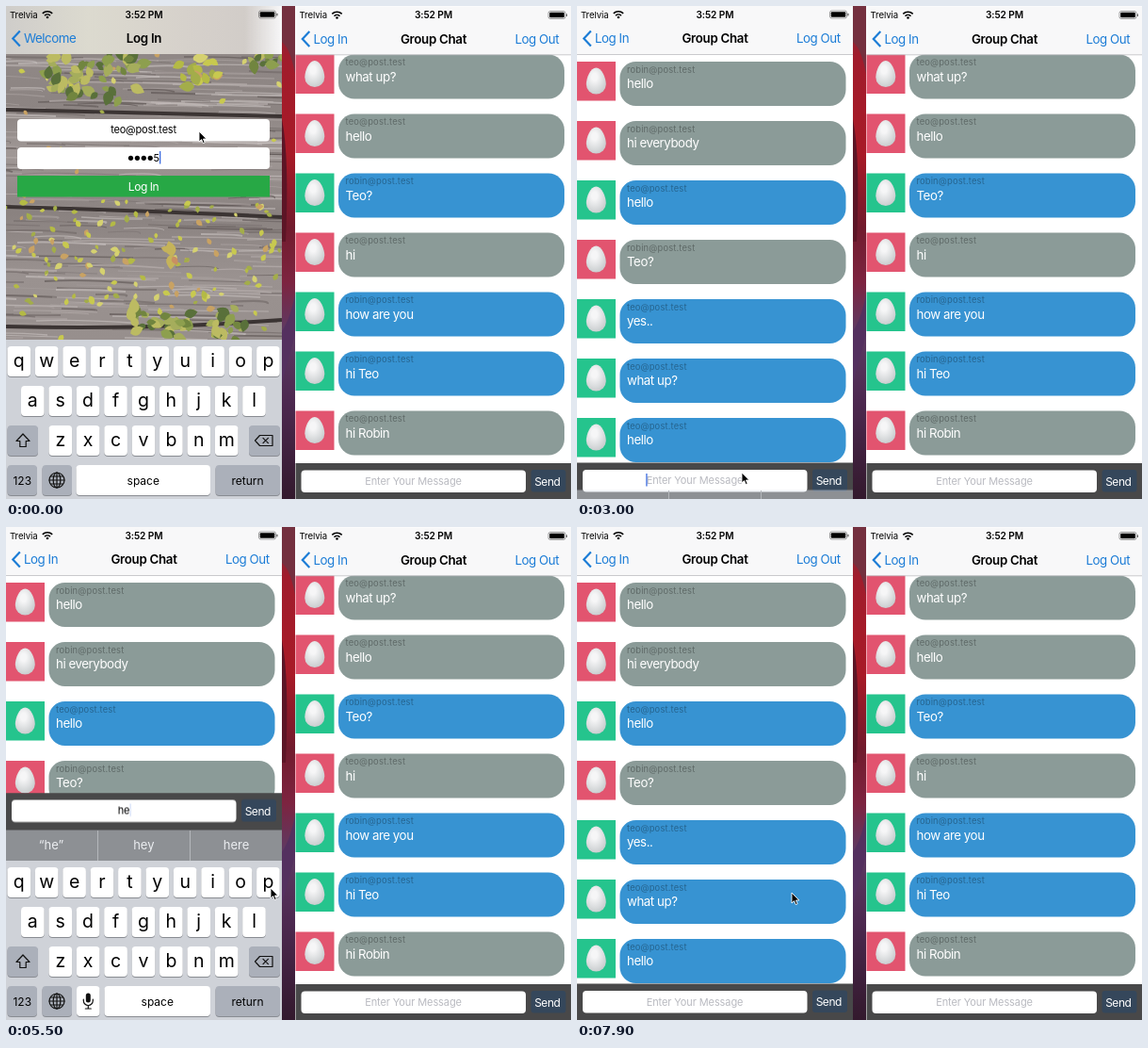
An HTML page that plays this animation: 600x523 px, repeating every 8 s.

```html
<!DOCTYPE html>
<html lang="en">
<head>
<meta charset="utf-8">
<title>Group chat on two phones</title>
<style>
html, body { margin: 0; width: 100%; height: 100%; overflow: hidden; background: #fff; }
svg { display: block; width: 100vw; height: 100vh; }
text { font: 400 13.3px Inter, Roboto, sans-serif; letter-spacing: -.45px; fill: #000; white-space: pre; }
.mid { text-anchor: middle; }
.title { font-weight: 600; letter-spacing: -.3px; }
.link { fill: #1b7cd6; }
.small { font-size: 9.6px; letter-spacing: -.1px; }
.clock { font-size: 10.2px; font-weight: 600; letter-spacing: -.1px; }
.mail { font-size: 9.4px; letter-spacing: .15px; fill: #000; fill-opacity: .32; }
.msg, .send { fill: #fff; }
.send { font-size: 12px; }
.field { font-size: 11px; letter-spacing: -.2px; }
.hint { font-size: 11px; letter-spacing: -.1px; fill: #b9bac0; }
.key { font-size: 19.5px; letter-spacing: 0; }
.cap { font-size: 12px; letter-spacing: 0; }
.guess { font-size: 13px; letter-spacing: 0; fill: #eceef1; }
.line { fill: none; stroke: #111; stroke-width: 1.2; stroke-linejoin: round; stroke-linecap: round; }
.spin { animation: spin 1s linear infinite; transform-origin: 146px 179px; }
@keyframes spin { to { transform: rotate(360deg); } }
</style>
</head>
<body>
<script>
const LOOP = 8000;
let sheet = '', count = 0, seed = 41;

// Returns a style attribute that plays [ms, declarations] pairs over the loop.
function track(frames, ease = 'ease-in-out') {
  const id = 'k' + count++;
  const all = [[0, frames[0][1]], ...frames, [LOOP, frames[frames.length - 1][1]]];
  sheet += `@keyframes ${id}{${all.map(([t, css]) => `${t / LOOP * 100}%{${css}}`).join('')}}`;
  return `style="animation:${id} ${LOOP}ms ${ease} infinite"`;
}
const show = (from, to) =>
  track([[0, 'opacity:0'], [from, 'opacity:1'], [to, 'opacity:0']], 'step-end');
const move = (x, y) => `transform:translate(${x}px,${y}px)`;
const slide = (x0, x1, from = 1985, to = 2500) => track([[from, move(x0, 0)], [to, move(x1, 0)]]);
const fade = (a, b, from = 2020, to = 2400) => track([[from, 'opacity:' + a], [to, 'opacity:' + b]]);

const rand = () => (seed = seed * 16807 % 2147483647) / 2147483647;
const span = (a, b) => a + rand() * (b - a);
const times = (n, make) => Array.from({ length: n }, (_, i) => make(i)).join('');
const pick = list => list[Math.floor(rand() * list.length)];

const rect = (x, y, w, h, fill, r = 0, extra = '') =>
  `<rect x="${x}" y="${y}" width="${w}" height="${h}" rx="${r}" fill="${fill}" ${extra}/>`;
const text = (x, y, cls, str, extra = '') => `<text x="${x}" y="${y}" class="${cls}" ${extra}>${str}</text>`;
const group = (attrs, ...parts) => `<g ${attrs}>${parts.join('')}</g>`;

// Wooden planks with scattered leaves
const greens = ['#71853f', '#8d9f4e', '#a5ad5c', '#59703a', '#bcbb62'];
const yellows = ['#c8c94f', '#b4ba45', '#d5d170', '#a3ad4a', '#c9a263'];
const grains = ['#5a5251', '#6f6665', '#aca4a2', '#bdb5b3', '#cac3c1'];
function leaf(x, y, size, fill) {
  return `<path d="M0 0Q.35-.65 1 0Q.35.65 0 0Z" fill="${fill}" transform="translate(${x.toFixed(1)} ${y.toFixed(1)}) rotate(${span(0, 360).toFixed()}) scale(${size.toFixed(1)})"/>`;
}
const cluster = (x, y, w, h, n, tones) =>
  times(n, () => leaf(x + span(-w, w), y + span(-h, h), span(8, 17), pick(tones)));

function photo() {
  const grain = times(320, () =>
    `<path d="M${span(-50, 270).toFixed()} ${span(50, 356).toFixed()}q40 ${span(-3, 3).toFixed(1)} ${span(30, 130).toFixed()} 2" stroke="${pick(grains)}" stroke-width="${span(.6, 2.2).toFixed(1)}" opacity=".6" fill="none"/>`);
  const seams = [[110, 117], [213, 224], [340, 333]].map(([a, b]) =>
    `<path d="M0 ${a}Q150 ${a + 4} 293 ${b}" stroke="#3b3433" stroke-width="4" fill="none"/>`).join('');
  return rect(0, 0, 293, 523, 'url(#wood)') + grain + seams +
    times(60, () => leaf(span(0, 290), span(54, 350), span(5, 9), pick(yellows))) +
    times(110, () => leaf(span(0, 290), span(206, 325), span(5, 10), pick(yellows))) +
    cluster(92, 74, 48, 22, 60, greens) + cluster(208, 70, 20, 16, 16, yellows) +
    cluster(276, 60, 14, 8, 12, greens) + cluster(165, 337, 36, 14, 30, greens) +
    cluster(238, 337, 20, 14, 18, greens) + cluster(175, 262, 5, 4, 4, ['#c98f62', '#c5b35a']);
}

// Keyboard
const key = (x, y, w, fill = '#fff') => rect(x, y + 1, w, 32, '#898c92', 4) + rect(x, y, w, 32, fill, 4);
const letters = (chars, x, y) => [...chars].map((c, i) =>
  key(x + i * 29.4, y, 24.6) + text(x + 12.3 + i * 29.4, y + 22, 'key mid', c)).join('');
function keyboard(mic) {
  const grey = '#abb0ba', left = mic ? 104.5 : 74.5;
  return rect(0, 354, 293, 170, '#cfd2d8') +
    letters('qwertyuiop', 1.5, 361) + letters('asdfghjkl', 16, 403) + letters('zxcvbnm', 45.5, 445) +
    key(1.5, 445, 32.5, grey) + key(258, 445, 33, grey) +
    '<path class="line" d="M18 454l7 7.5h-3.8v6h-6.4v-6H11Z"/>' +
    '<path class="line" d="M264.5 461l5-5.5h13.5v11h-13.5ZM273 458.3l5.4 5.4m0-5.4l-5.4 5.4"/>' +
    key(1.5, 487, 31.5, grey) + text(17.3, 507.5, 'cap mid', '123') +
    key(38.5, 487, 31.5, grey) +
    '<circle class="line" cx="54" cy="503" r="8"/><ellipse class="line" cx="54" cy="503" rx="3.8" ry="8"/><path class="line" d="M46 503h16M54 495v16M47.5 499h13M47.5 507h13"/>' +
    (mic ? key(75, 487, 24.5) + rect(84.8, 494.5, 5, 10, '#111', 2.5) +
      '<path class="line" d="M82.3 501v1.5a5 5 0 0 0 10 0v-1.5M87.3 507.5v3.5m-3 0h6"/>' : '') +
    key(left, 487, 217 - left) + text((left + 217) / 2, 507.5, 'cap mid', 'space') +
    key(222.5, 487, 68.5, grey) + text(256.5, 507.5, 'cap mid', 'return');
}

// Chat parts
const mails = { teo: 'teo@post.test', robin: 'robin@post.test' };
const rows = (me, top, list) => list.map(([who, words], i) => {
  const y = top + i * 63, mine = who === me;
  return rect(0, y, 41, 41.5, mine ? '#25c48d' : '#e2546f') +
    `<path transform="translate(20.3 ${y + 20.5})" fill="url(#egg)" d="M0-14C6-14 10.5-3 10.5 3.5A10.5 10.5 0 0 1-10.5 3.5C-10.5-3-6-14 0-14Z"/>` +
    rect(45.5, y, 240, 47, mine ? '#3793d2' : '#8b9b98', 17) +
    text(53, y + 11.8, 'mail', mails[who]) + text(53, y + 28, 'msg', words);
}).join('');

const bar = (content, sendStyle = '') =>
  rect(0, 484.5, 293, 320, '#484849') + rect(6, 492, 238.5, 23.5, '#fff', 4) +
  rect(250, 491.5, 37, 23.5, '#35475b', 3) + text(267.3, 508, 'send mid', 'Send', sendStyle) + content;
const hint = (style = '') => text(125, 507.5, 'hint mid', 'Enter Your Message', style);

// Top bar parts
const status = text(4, 12.5, 'small', 'Trelvia') +
  '<path d="M38.8 7.8a7.5 7.5 0 0 1 10.4 0M41 10.2a4.3 4.3 0 0 1 6 0" fill="none" stroke="#000" stroke-width="1.6"/><circle cx="44" cy="12" r="1.3"/>' +
  text(146.5, 12.8, 'clock mid', '3:52 PM') +
  rect(268.5, 5, 18, 8, 'none', 2, 'stroke="#000" stroke-opacity=".45" stroke-width=".8"') +
  rect(269.7, 6.2, 15.6, 5.6, '#000', 1) + rect(287.3, 7.7, 1.2, 2.8, '#666', .5);
const chevron = '<path d="M14.8 26.5L7.3 34.5l7.5 8" fill="none" stroke="#1b7cd6" stroke-width="2.2"/>';
const navBack = rect(0, 0, 293, 51, '#f8f8f9') + rect(0, 51, 293, .7, '#b4b4b8');
const title = (s, style) => text(146.5, 39, 'title mid', s, style);
const back = (s, style) => text(19, 39, 'link', s, style);
const logOut = style => text(233, 39, 'link', 'Log Out', style);

// Left phone: login screen
const dots = n => times(n, i => `<circle cx="${132.5 + i * 6.9}" cy="161.3" r="2.6"/>`);
const caret = (x, y) => rect(x, y, 1.3, 13.5, '#3b6be0');
const login = group(slide(0, -88),
  photo(),
  rect(12, 120, 268, 23.5, '#fff', 4), text(146, 135.3, 'field mid', mails.teo),
  rect(12, 150, 268, 23, '#fff', 4),
  group(show(0, 300), dots(4), text(156.5, 165, 'field', '5'), caret(163, 154)),
  group('transform="translate(-3.5)"',
    group(show(300, 800), dots(5), text(163.5, 165, 'field', '6'), caret(170.5, 154)),
    group(show(800, LOOP), dots(6))),
  rect(12, 180, 268, 22.5, '#27a845'), text(146, 195.5, 'send mid', 'Log In'),
  keyboard(false));

// Left phone: typing
const typed = [[4200, 'h', 3.5], [4700, 'he', 6.5], [6000, 'hel', 7.8], [6300, 'hell', 9], [6650, 'hello', 12.3]];
const guesses = [[2900, 'I', 'the', 'I’m'], [4200, '“h”', 'he', 'hey'], [4700, '“he”', 'hey', 'here'],
  [6000, '“hel”', 'help', 'held'], [6300, '“hell”', 'hello', 'hells'], [6650, '“hello”', 'hellos', 'hello’s']];
const until = (list, i) => i + 1 < list.length ? list[i + 1][0] : 7150;
const blink = track([[0, 'opacity:1'], [5200, 'opacity:.2'], [5650, 'opacity:1']], 'step-end');

const entry =
  group(show(0, 4200), hint()) + group(show(7300, LOOP), hint()) +
  group(show(2920, 3450), caret(73.3, 496)) + group(show(3950, 4200), caret(73.3, 496)) +
  typed.map(([t, s, half], i) => group(show(t, until(typed, i)),
    text(125, 507.3, 'field mid', s), group(blink, caret(125 + half, 496)))).join('') +
  group(show(7150, 7300), text(119, 506, 'field mid', 'hello'));

const lift = (from, to, up, down) => track([[up[0], move(0, from)], [up[1], move(0, to)],
  [down[0], move(0, to)], [down[1], move(0, from)]]);

const chat = group(slide(293, 0),
  rect(0, 0, 293, 523, '#fff'),
  group(show(2550, LOOP), rows('teo', 59, [['robin', 'hello'], ['robin', 'hi everybody'], ['teo', 'hello'],
    ['robin', 'Teo?'], ['teo', 'yes..'], ['teo', 'what up?'], ['teo', 'hello']])),
  group(lift(0, -202.5, [3000, 3450], [7250, 7650]),
    bar(entry, track([[0, 'opacity:1'], [7150, 'opacity:.28'], [7550, 'opacity:1']], 'step-end'))),
  group(lift(202, 0, [2930, 3380], [7250, 7620]),
    group(show(0, 7150),
      rect(0, 321.5, 293, 33, '#dfe4ee', 0, 'opacity=".46"'),
      [97, 195].map(x => rect(x, 322, 1, 32, '#b4b7bc')).join(''),
      guesses.map(([t, ...words], i) => group(show(t, until(guesses, i)),
        words.map((w, j) => text(48 + j * 98.3, 341.5, 'guess mid', w)).join(''))).join('')),
    keyboard(true)));

const leftNav = rect(0, 0, 293, 51, 'url(#haze)') +
  group(slide(293, 0), rect(-40, 0, 41, 51, 'url(#edge)'), navBack) + status + chevron +
  group(slide(0, -60), back('Welcome', fade(1, 0))) +
  group(slide(0, -109), title('Log In', fade(1, 0))) +
  group(slide(109, 0), back('Log In', fade(0, 1))) +
  group(slide(110, 0), title('Group Chat', fade(0, 1, 2090))) +
  group(slide(38, 0), logOut(fade(0, 1)));

const hud = group(track([[0, 'opacity:0'], [1080, 'opacity:0'], [1250, 'opacity:1'], [2120, 'opacity:1'], [2400, 'opacity:0']], 'linear'),
  rect(113, 146, 66.5, 66, '#cfe4d5', 8),
  '<circle class="spin" cx="146" cy="179" r="18" fill="none" stroke="url(#ring)" stroke-width="1.6"/>');

const right = group('transform="translate(307.5 .5)"',
  rect(-.5, -1, 294, 525, '#fff'),
  rows('robin', 51, [['teo', 'what up?'], ['teo', 'hello'], ['robin', 'Teo?'], ['teo', 'hi'],
    ['robin', 'how are you'], ['robin', 'hi Teo'], ['teo', 'hi Robin']]),
  bar(hint()), navBack, status, chevron, back('Log In'), title('Group Chat'), logOut());

// Desktop showing between the phones
const desktop = rect(293, 0, 15, 523, 'url(#wall)') +
  '<path d="M293 38Q303 46 308 78V0H293Z" fill="#74303f"/>' +
  '<path d="M293 120Q301 160 297 250H293Z" fill="#5c1526"/>' +
  '<path d="M293 345Q303 330 308 300V345L293 400Z" fill="#54305f"/>';

// Pointer path: time, x, y
const path = [[0, 205, 133], [150, 205, 133], [800, 101, 186], [1100, 104, 186], [1800, 222, 425], [2100, 248, 470],
  [2700, 175, 495], [3150, 175, 495], [4000, 144, 416], [4200, 144, 416], [4400, 98, 387], [4650, 73, 376],
  [4850, 73, 376], [5500, 281, 383], [5900, 263, 416], [6350, 263, 416], [6620, 248, 376], [6750, 248, 376],
  [7100, 277, 307], [7200, 278, 311], [7350, 278, 311], [7850, 228, 388]];
const pointer = group(track(path.map(([t, x, y]) => [t, move(x, y)])),
  '<path d="M0 0V11L2.6 8.6 4.3 12.6 6.2 11.8 4.5 8H7.9Z" fill="#000" stroke="#fff" stroke-width=".9" stroke-linejoin="round"/>');

const gradient = (id, vertical, stops) =>
  `<linearGradient id="${id}" x2="${vertical ? 0 : 1}" y2="${vertical ? 1 : 0}">${stops.map(([o, c]) => `<stop offset="${o}" stop-color="${c}"/>`).join('')}</linearGradient>`;

const scene = `<svg viewBox="0 0 600 523" preserveAspectRatio="none"><defs>
  ${gradient('wood', true, [[0, '#948c8a'], [.21, '#8c8482'], [.3, '#a09896'], [.42, '#8a8280'], [.55, '#9a9290'], [1, '#8f8785']])}
  ${gradient('haze', false, [[0, '#cfcdca'], [.3, '#dcdacf'], [.65, '#d6d1cb'], [1, '#cfcac7']])}
  ${gradient('edge', false, [[0, '#f8f8f900'], [1, '#f8f8f9']])}
  ${gradient('ring', false, [[0, '#a9c2b2'], [.35, '#6f8577'], [.7, '#17231c'], [1, '#17231c']])}
  ${gradient('wall', true, [[0, '#74303f'], [.1, '#a01c2c'], [.3, '#a81a27'], [.45, '#711b2d'], [.56, '#7d2440'], [.66, '#5d3a63'], [.8, '#4d2950'], [1, '#33192d']])}
  <radialGradient id="egg" cx=".42" cy=".35" r=".7"><stop offset=".2" stop-color="#f6f6f7"/><stop offset="1" stop-color="#c6cacc"/></radialGradient>
  <clipPath id="screen"><rect width="293" height="523"/></clipPath></defs>
  ${desktop}
  ${group('clip-path="url(#screen)"', login, chat, leftNav, hud)}
  ${right}${pointer}</svg>`;

const style = document.createElement('style');
style.textContent = sheet;
document.head.append(style);
document.body.insertAdjacentHTML('beforeend', scene);
</script>
</body>
</html>
```
